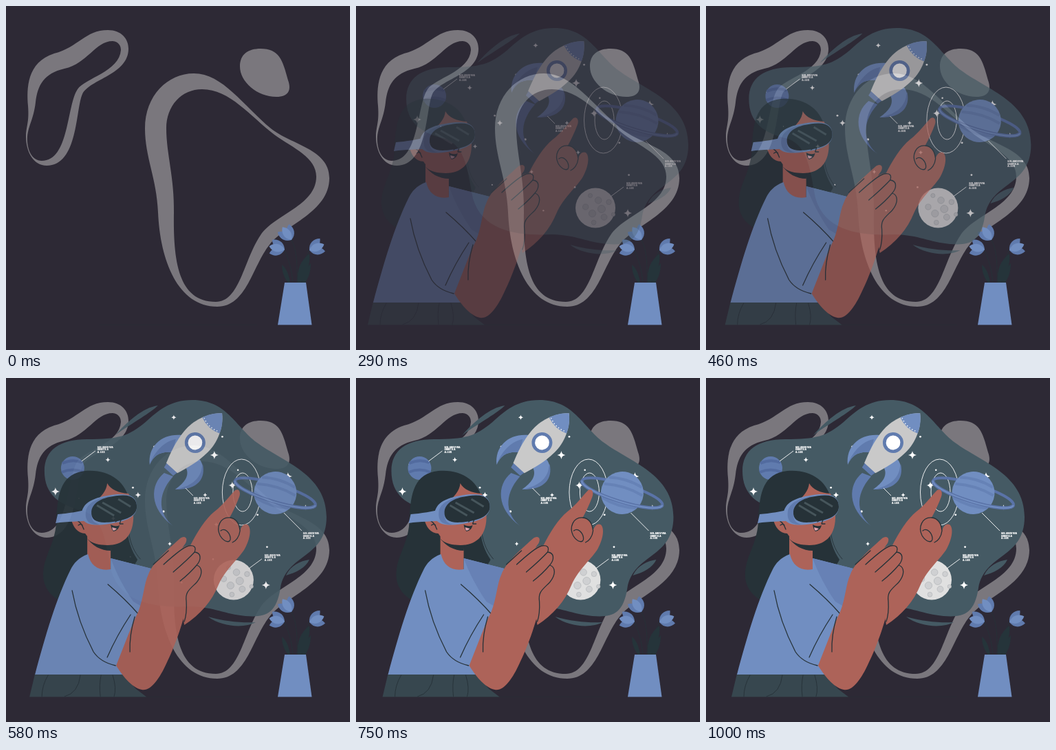
An HTML page for the animation above (1.04 s loop, 500 by 500 pixels).

```html
<!DOCTYPE html>
<html lang="en">
<head>
<meta charset="utf-8">
<title>Exploring space</title>
<style>
html, body { margin: 0; width: 100%; height: 100%; overflow: hidden; background: #2d2935; }
svg { display: block; width: 100%; height: 100%; }
text { font: 900 3.2px Inter, Arial, sans-serif; fill: #fff; stroke: #fff; stroke-width: .2; }
.blue { fill: #718ec1; }
.deep { fill: #607bae; }
.dark { fill: #263238; }
.skin { fill: #ad6359; }
.slate { fill: #455a64; }
.white { fill: #fff; }
.ink { fill: none; stroke: #263238; stroke-width: 1.3; stroke-linecap: round; stroke-linejoin: round; }
.thin { stroke-width: .9; }
.ray { fill: none; stroke: #fff; stroke-width: .9; }
</style>
</head>
<body>
<svg viewBox="0 0 500 500">
  <g id="blobs" fill="#7a777d" fill-rule="evenodd">
    <path d="M148,35C168,35 178,48 178,62C178,100 122,106 111,128C101,150 105,232 59,232C40,232 29,212 29,190C29,175 34,170 32,145C30,120 30,82 70,69C105,60 115,35 148,35Z
      M155,51C164,52 167,58 167,64C165,95 115,105 104,121C88,145 92,225 52,225C37,225 30,208 31,190C33,172 40,165 43,140C46,115 55,98 85,91C118,84 130,51 155,51Z"/>
    <path d="M273,98C315,98 345,145 385,178C415,202 470,208 470,250C470,300 405,318 383,347C358,378 350,437 307,437C250,437 224,370 221,300C219,250 202,220 202,178C202,130 235,98 273,98Z
      M285,121C325,121 355,160 390,187C418,207 451,220 451,248C451,290 390,303 370,333C345,370 340,430 305,430C250,430 243,370 244,300C245,250 233,215 233,178C233,145 255,121 285,121Z"/>
    <path d="M370,62C397,62 402,78 410,108C415,122 411,132 393,132C365,132 340,110 340,88C340,70 352,62 370,62Z"/>
  </g>
  <path d="M135,463.2H365" stroke="#272f38" stroke-width=".6"/>

  <g id="plant">
    <path class="ink thin" d="M423,402C424,375 422,350 414,339M417,402C416,385 410,365 404,353M427,402C430,385 434,366 442,353"/>
    <path fill="#25343a" d="M413,402C411,389 407,381 401,376C401,387 405,396 410,402ZM424,402C422,383 429,369 441,360C443,376 436,391 429,402ZM430,402C432,391 437,381 443,374C443,387 439,396 435,402Z"/>
    <g id="flowers"></g>
    <path class="blue" d="M405,402H436L444.5,463.5H395Z"/>
  </g>

  <g id="space">
    <clipPath id="cloudClip"><path id="cloud" d="M268,32C318,32 330,70 362,94C400,122 463,140 463,202C463,262 405,255 396,305C390,345 372,348 345,346C315,343 300,333 265,332C220,334 165,330 150,280C142,240 140,205 110,193C75,185 53,170 53,135C53,105 75,89 115,89C160,89 175,85 200,64C218,48 235,32 268,32Z"/></clipPath>
    <use href="#cloud" class="slate"/>
    <path class="slate" d="M156,83C174,63 196,43 218,40C207,51 184,63 156,83ZM404,287C411,272 425,266 438,264C433,276 418,283 404,287ZM291,347C315,354 340,356 360,355C344,364 311,362 291,347Z"/>
    <g id="sky" class="white" clip-path="url(#cloudClip)"></g>

    <circle class="deep" cx="94" cy="131" r="17"/>
    <path d="M79,124Q94,117 108,123M78,137Q94,130 110,137" fill="none" stroke="#526b9f" stroke-width="4"/>

    <path class="deep" d="M227,138C206,155 205,190 240,215C221,200 214,172 240,143Z"/>
    <path class="blue" d="M253,83C225,80 203,98 206,126C212,112 222,106 239,108ZM277,117C289,127 287,160 243,162C257,152 264,142 259,131Z"/>
    <path class="deep" d="M244,89C230,91 214,104 206,126C212,112 222,106 239,108ZM282,129C280,148 264,158 243,162C275,163 288,147 283,125Z"/>
    <g transform="translate(272 94) rotate(42.5)">
      <path class="deep" d="M-11,47H11L9,57H-9Z"/>
      <path fill="#c9c9c9" d="M0,-58C16,-44 24,-22 23,-2C22,18 16,36 11,50H-11C-16,36 -22,18 -23,-2C-24,-22 -16,-44 0,-58Z"/>
      <path class="blue" d="M0,-58C8,-51 14,-43 17,-34Q0,-27 -17,-34C-14,-43 -8,-51 0,-58Z"/>
      <path d="M-14,-35Q0,-29 14,-35" fill="none" stroke="#fff" stroke-width="1.6" stroke-linecap="round" stroke-dasharray="0 4.4"/>
      <circle r="12.7" class="white" stroke="#607bae" stroke-width="4.6"/>
    </g>

    <g class="ray">
      <ellipse cx="339.5" cy="166" rx="28" ry="48"/>
      <ellipse cx="341" cy="166" rx="14" ry="28"/>
    </g>

    <g transform="translate(388.5 167) rotate(17)" fill="none" stroke="#5a73a8" stroke-width="4">
      <path d="M-61,0A61,13 0 0 1 61,0"/>
      <circle r="31" class="blue" stroke="none"/>
      <path d="M-25,-16Q0,-23 25,-16M-29,-5Q0,-12 29,-5M-26,15Q0,22 26,15" opacity=".45"/>
      <path d="M-61,0A61,13 0 0 0 61,0" stroke-width="5"/>
      <path d="M-61,0A61,13 0 0 0 61,0" stroke="#718ec1" stroke-width="2"/>
    </g>

    <circle cx="328" cy="293.5" r="29" fill="#e0e0e0"/>
    <g id="craters" fill="#cfd0d2" stroke="#b4b6b9" stroke-width=".7"></g>
    <g id="callouts"></g>
  </g>

  <g id="woman">
    <path class="dark" d="M118,135C150,132 178,148 183,182L179,214C179,236 186,252 194,264C190,274 180,280 168,284L100,330C74,325 55,308 57,282C59,256 76,238 76,205C78,165 84,139 118,135Z"/>
    <path class="ink thin" d="M181,222C183,241 190,254 198,263"/>
    <path class="skin" d="M121,220V262L126,283H155V236Z"/>
    <path class="dark" d="M119,231C126,241 139,244 156,242L155,251C141,251 128,244 119,231Z"/>
    <path class="skin" d="M150,153C155,162 166,167 181,168L188,185V204C187,231 172,243 150,243C134,242 123,234 118,226C107,226 100,216 98,206C99,198 107,198 115,203L113,195L132,180C141,173 149,164 150,153Z"/>
    <path class="ink" d="M103,206Q112,208 116,220M108,214Q112,211 114,214"/>

    <path class="blue" d="M78,198C92,197 110,194 127,190V207C110,209 92,208 75,211Z"/>
    <path class="blue" d="M113,195C116,179 134,172 165,169C184,168 193,173 193,187C193,201 180,208 153,212C127,216 111,213 113,195Z"/>
    <path class="deep" d="M119,193C122,181 135,175 158,171C136,179 129,187 127,198C127,207 131,211 139,213C123,214 117,207 119,193Z"/>
    <path class="dark" d="M127,194C129,179 146,172 172,170.5C187,170 193,177 193,187C193,199 181,206 158,209C137,212 126,208 127,194Z"/>
    <path d="M135,185L160,200M143,181L170,196M166,176L184,187" stroke="#46555b" stroke-width="3"/>
    <path class="ink" d="M162,209L171,203L168,212L173,212"/>
    <path class="dark" d="M155,213Q162,217 168,214Q166,222 159,223Q156,220 155,213Z"/>
    <path d="M157,217Q161,218 164,219Q160,223 158,221Z" fill="#e3a3ad"/>

    <path fill="#37474f" d="M45,430H172L192,452L207,463.5H37Z"/>
    <path class="ink thin" d="M64,432Q55,447 55,463M111,432Q108,458 88,463M141,432Q138,446 140,463M158,432Q164,451 160,463"/>
    <path class="blue" d="M122,256C108,261 101,270 97,278C76,320 60,375 45,431H174L202,350L214,277L155,262V278C139,281 126,274 122,256Z"/>
    <path fill="#6781b5" d="M155,262L214,277L205,335L188,325C174,305 163,283 155,262Z"/>
    <path class="ink" d="M99,309C105,342 117,373 130,398Q140,413 162,418M151,300Q177,322 196,344M184,344Q164,374 150,406"/>

    <path class="skin" d="M262,359L252,300L270,245C280,225 293,204 306,194C319,184 328,171 336,163C342,160 345,167 341,175C336,188 331,197 328,203C337,203 342,212 343,222C345,214 350,211 354,213C360,218 358,233 350,248C342,262 322,278 312,300C302,325 285,344 262,359Z"/>
    <path class="ink" d="M328,203C314,202 308,217 314,229C320,239 330,241 329,232C328,225 321,217 315,222M328,203C338,204 342,213 343,222C342,231 337,237 332,239"/>
    <path class="skin" d="M163,418C175,388 185,360 195,340C203,320 203,300 210,285C216,269 235,252 255,234C262,228 268,232 264,240L259,247C270,240 281,242 278,252C286,254 288,262 281,271C289,276 288,286 280,296C270,308 265,312 266,327C261,356 246,395 236,415C226,437 213,456 200,453C185,450 171,431 163,418Z"/>
    <path class="ink" d="M217,271L239,251M232,271C243,261 260,246 268,244Q281,242 277,253Q267,264 246,282M277,253C287,254 287,264 280,272Q270,284 256,295M280,272C289,275 289,286 280,297C269,308 263,311 265,325Q266,342 262,354M183,398Q182,374 190,347"/>
  </g>
</svg>
<script>
const LOOP = 1040, FRAME = 1000 / 24, SLIDE = 30, GOLDEN = 2.39996;
const $ = id => document.getElementById(id);
const repeat = (n, make) => Array.from({ length: n }, (_, i) => make(i)).join('');

let seed = 7;
const random = () => (seed = seed * 16807 % 2147483647) / 2147483647;

// Points spread evenly over an ellipse
function spread(i, n, cx, cy, rx, ry) {
  const r = Math.sqrt((i + .5) / n), a = i * GOLDEN;
  return [cx + rx * r * Math.cos(a), cy + ry * r * Math.sin(a)];
}

const dot = (x, y, r) => `<circle cx="${x}" cy="${y}" r="${r}"/>`;
const star = (x, y, s) => `<path transform="translate(${x} ${y}) scale(${s})"
  d="M0,-1Q.12,-.12 1,0Q.12,.12 0,1Q-.12,.12 -1,0Q-.12,-.12 0,-1Z"/>`;

$('sky').innerHTML =
  star(69, 165, 6) + star(189, 170, 4.5) + star(300, 112, 6) + star(326, 156, 5.5) + star(407, 143, 6) + star(375, 301, 6) +
  repeat(27, i => {
    const [x, y] = spread(i, 27, 260, 170, 195, 150);
    return i % 3 ? dot(x, y, .7 + random()) : star(x, y, 3 + random());
  });

$('craters').innerHTML = repeat(9, i => dot(...spread(i, 9, 331, 295, 25, 24), 5.5 - i * .35));

const petal = (angle, fill) =>
  `<path transform="rotate(${angle})" fill="${fill}" d="M0,0C-8,-7 -7,-17 0,-23C7,-17 8,-7 0,0Z"/>`;
const flower = (x, y, turn) => `<g transform="translate(${x} ${y}) rotate(${turn})">` +
  petal(-26, '#607bae') + petal(26, '#607bae') + petal(0, '#718ec1') + '</g>';
$('flowers').innerHTML = flower(415, 340, -35) + flower(405, 354, -78) + flower(441, 355, 68);

const callout = (x, y, line) => `<path class="ray" d="${line}"/>` +
  ['SOL ARCU VIA', 'ORBIT II.A', 'A. LUX'].map((s, i) => `<text x="${x}" y="${y + i * 3.5}">${s}</text>`).join('');
$('callouts').innerHTML = callout(130, 101.5, 'M107,121L127,106') + callout(270, 175.5, 'M258,160L269,171') +
  callout(429, 227, 'M401,196L427,222') + callout(373, 258.5, 'M350,277L369,263');

// cubic-bezier(.36, -.01, .5, 1.38)
const bezier = (a, b, s) => 3 * (1 - s) ** 2 * s * a + 3 * (1 - s) * s * s * b + s ** 3;
function ease(x) {
  let lo = 0, hi = 1;
  for (let i = 0; i < 30; i++) {
    const mid = (lo + hi) / 2;
    if (bezier(.36, .5, mid) < x) lo = mid; else hi = mid;
  }
  return bezier(-.01, 1.38, lo);
}

function place(id, dx, opacity) {
  $(id).setAttribute('transform', `translate(${dx.toFixed(2)} 0)`);
  $(id).setAttribute('opacity', opacity.toFixed(3));
}

function render(ms) {
  const step = Math.floor((ms % LOOP + 4) / FRAME);
  const e = step < 3 ? 0 : ease(Math.min(1, step / 24 + .013));
  const opacity = Math.max(0, Math.min(1, e));
  place('space', SLIDE * (1 - e), opacity);
  place('woman', -SLIDE * (1 - e), opacity);
}

function tick() {
  render(performance.now());
  requestAnimationFrame(tick);
}
tick();
</script>
</body>
</html>
```
